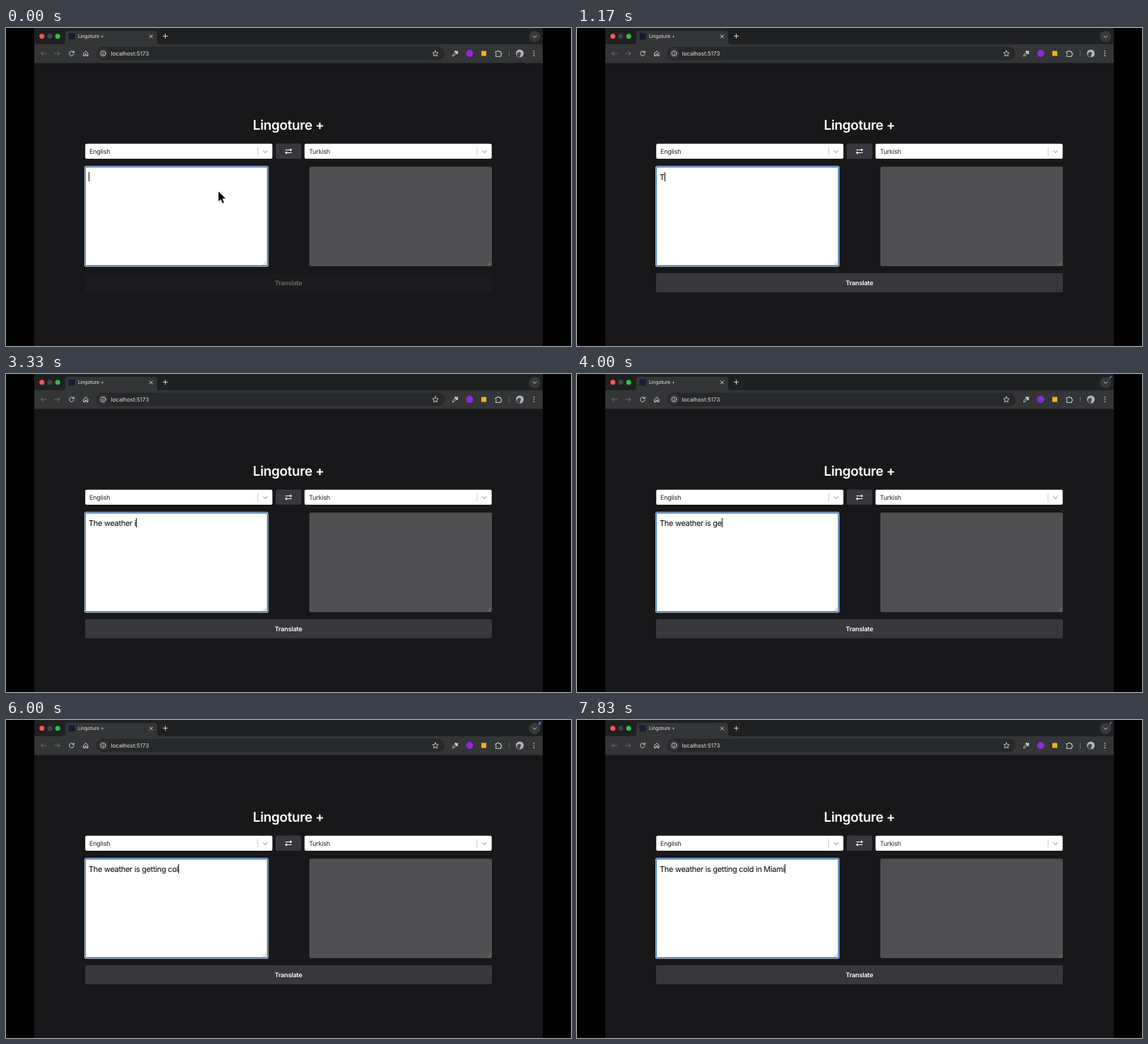
An HTML page that plays this animation: 800x450 px, repeating every 8 s.

```html
<!DOCTYPE html>
<html lang="en">
<head>
<meta charset="utf-8">
<title>Lingoture +</title>
<style>
  html, body { margin: 0; width: 100%; height: 100%; overflow: hidden; background: #000; }
  body { position: relative; font-family: Inter, "Liberation Sans", sans-serif; }
  svg { display: block; }
  text { letter-spacing: -.02em; text-rendering: geometricPrecision; }
  .line { fill: none; stroke: #d5d6d8; stroke-linecap: round; stroke-linejoin: round; }
  .dim { stroke: #707174; }
  .label { font-size: 9px; fill: #202124; }
  #typed {
    position: absolute; left: 117px; top: 204px; height: 13px;
    border-right: 1px solid #111; color: #000; white-space: pre;
    font-size: 11px; line-height: 15px; letter-spacing: -.028em;
    text-rendering: geometricPrecision;
  }
</style>
</head>
<body>
<svg width="800" height="450" viewBox="0 0 800 450">
  <defs>
    <g id="select">
      <rect x=".2" y=".3" width="265" height="21.200" rx="2" fill="#fff"/>
      <path d="M244.500 5v12" stroke="#ccc"/>
      <path d="M252 9.800l3 3 3-3" fill="none" stroke="#aaa" stroke-width="1.200"/>
    </g>
    <path id="grip" d="M-5 0L0-5M-2 0L0-2" fill="none" stroke-width=".6"/>
  </defs>

  <!-- browser window -->
  <rect x="40" width="720" height="450" fill="#18181a"/>
  <rect x="40" width="720" height="24" fill="#1f2021"/>
  <rect x="40" y="23" width="720" height="26.500" fill="#343536"/>
  <path d="M80 23q4 0 4-4V8q0-4 4-4h122q4 0 4 4v11q0 4 4 4z" fill="#343536"/>
  <circle cx="50.800" cy="11.700" r="3.500" fill="#fb5850"/>
  <circle cx="62" cy="11.700" r="3.500" fill="#434446"/>
  <circle cx="73.200" cy="11.700" r="3.500" fill="#2ac63f"/>
  <rect x="88.500" y="7.500" width="9" height="9" fill="#1a1a35"/>
  <text x="102" y="14.400" font-size="7" fill="#e4e5e7">Lingoture +</text>
  <path class="line" d="M203.500 10l4 4m0-4l-4 4M222.500 11.500h6m-3-3v6"/>
  <circle cx="748.500" cy="12" r="8" fill="#37383a"/>
  <path class="line" d="M746 11l2.500 2.500L751 11"/>
  <circle id="dot" cx="755.800" cy="4.500" r="2.200" fill="#5c58c4"/>
  <path id="dash" d="M754.500 5.500l2-2" stroke="#5c58c4" stroke-width="2.200" stroke-linecap="round"/>

  <!-- toolbar -->
  <rect x="128" y="26.500" width="493" height="19" rx="9.500" fill="#272829"/>
  <circle cx="137.500" cy="36" r="7" fill="#37383a"/>
  <path class="line dim" d="M56.500 36h-7m3-3l-3 3 3 3M69 36h7m-3-3l3 3-3 3"/>
  <path class="line" d="M95.800 34.300a3.300 3.300 0 1 0 .4 2.500M96.200 32.500v2.200h-2.200M110 35.500l3-2.800 3 2.800v4h-2v-2.500h-2v2.500h-2z"/>
  <circle class="line" cx="137.500" cy="36" r="3.500" stroke-width=".9"/>
  <path class="line" d="M137.500 36v1.800m0-3.700v.1" stroke-width=".9"/>
  <text x="148.500" y="39" font-size="8" fill="#e4e5e7" style="letter-spacing:0">localhost:5173</text>
  <path class="line" d="M608 32l1.200 2.700 2.900.3-2.200 2 .6 2.900-2.500-1.500-2.500 1.500.6-2.900-2.200-2 2.900-.3z" stroke-width=".9"/>
  <path class="line" d="M632.500 39.500l.5-2 3.200-3.200 1.500 1.500-3.200 3.200z" stroke-width=".9"/>
  <path class="line" d="M636 33l3 3m-1.300-1.300l1.500-1.500" stroke-width="2"/>
  <circle cx="656.500" cy="36" r="5" fill="#9128dd"/>
  <rect x="673" y="32.500" width="7" height="7" fill="#f3b414"/>
  <path class="line" d="M693.500 33.500h2.200a1.200 1.200 0 1 1 2.300 0h2.500v2.300a1.200 1.200 0 1 1 0 2.300v2.200h-7v-2.200a1.200 1.200 0 0 0 0-2.300z"/>
  <path d="M712.500 32v8" stroke="#606164"/>
  <circle cx="727.500" cy="36" r="5.500" fill="#b6b7b9"/>
  <path d="M723.500 39.800q-1-5 3-6 3 0 2.500 3-1 3-2 4.600z" fill="#434447"/>
  <path class="line" d="M747.500 32.800v.01m0 3.190v.01m0 3.190v.01" stroke-width="1.700"/>

  <!-- page -->
  <text x="400" y="144.300" text-anchor="middle" font-size="19" font-weight="600" fill="#fff">Lingoture +</text>
  <use href="#select" x="112" y="163.500"/>
  <use href="#select" x="422.500" y="163.500"/>
  <text class="label" x="118" y="178">English</text>
  <text class="label" x="429" y="178">Turkish</text>
  <rect x="382" y="163.500" width="36" height="21.500" rx="2" fill="#38373d"/>
  <path d="M395.500 172.500h8m-7 4h8" stroke="#fff" stroke-width="1.200"/>
  <path d="M402.500 170l2.500 2.500-2.500 2.500zM397.500 174l-2.500 2.500 2.500 2.500z" fill="#fff"/>
  <rect x="111" y="195.300" width="260.500" height="142.400" rx="2.500" fill="#e9f1fc"/>
  <rect x="112.300" y="196.600" width="257.900" height="139.800" rx="1.500" fill="#fff" stroke="#1f5fb5" stroke-width="1.200"/>
  <use href="#grip" x="369" y="335.500" stroke="#777"/>
  <rect x="429.500" y="196.300" width="258.500" height="140.700" rx="2" fill="#505052"/>
  <use href="#grip" x="687" y="336" stroke="#999"/>
  <rect id="button" x="112" y="347" width="576" height="27" rx="2"/>
  <text id="action" x="400" y="364" text-anchor="middle" font-size="9" font-weight="600">Translate</text>

  <!-- pointers -->
  <path id="arrow" d="M300.500 230.500v15.500l3.500-3.300 2.500 5.700 2.700-1.200-2.500-5.500h4.900z" fill="#000" stroke="#fff" stroke-width=".8"/>
  <path id="beam" d="M298.500 222q2.500 0 2.500 2v13q0 2-2.500 2m5-17q-2.500 0-2.500 2v13q0 2 2.500 2m-4-7h3" fill="none" stroke="#222"/>
</svg>
<div id="typed"></div>

<script>
  const LOOP = 8000;
  const SENTENCE = "The weather is getting cold in Miami";
  // [time in ms, letters typed]
  const KEYS = [
    [1000, 1], [1330, 2], [1500, 3], [1670, 4], [1830, 5], [2000, 6], [2330, 8],
    [2670, 10], [3000, 12], [3330, 13], [3500, 15], [4000, 17], [4330, 18],
    [4670, 19], [5000, 21], [5170, 22], [5330, 23], [5500, 24], [5670, 25],
    [6000, 26], [6170, 27], [6330, 28], [6670, 29], [6830, 30], [7000, 31],
    [7330, 32], [7500, 33], [7670, 34], [7830, 36]
  ];
  const el = id => document.getElementById(id);
  const show = (id, on) => { el(id).style.visibility = on ? "visible" : "hidden"; };

  function draw(t) {
    const count = KEYS.reduce((n, [time, letters]) => t >= time ? letters : n, 0);
    const typed = el("typed");
    typed.textContent = SENTENCE.slice(0, count);
    typed.style.borderColor = t >= 500 && t < 1000 ? "transparent" : "#111";

    el("button").setAttribute("fill", count ? "#38373d" : "#1c1c1e");
    el("action").setAttribute("fill", count ? "#fff" : "#6b6b6d");

    show("arrow", t < 170);
    show("beam", t >= 170 && t < 1000);
    const round = t >= 4670 && t < 7330;
    show("dot", round);
    show("dash", t >= 4000 && !round);
  }

  function tick() {
    draw(performance.now() % LOOP);
    requestAnimationFrame(tick);
  }
  tick();
</script>
</body>
</html>
```
